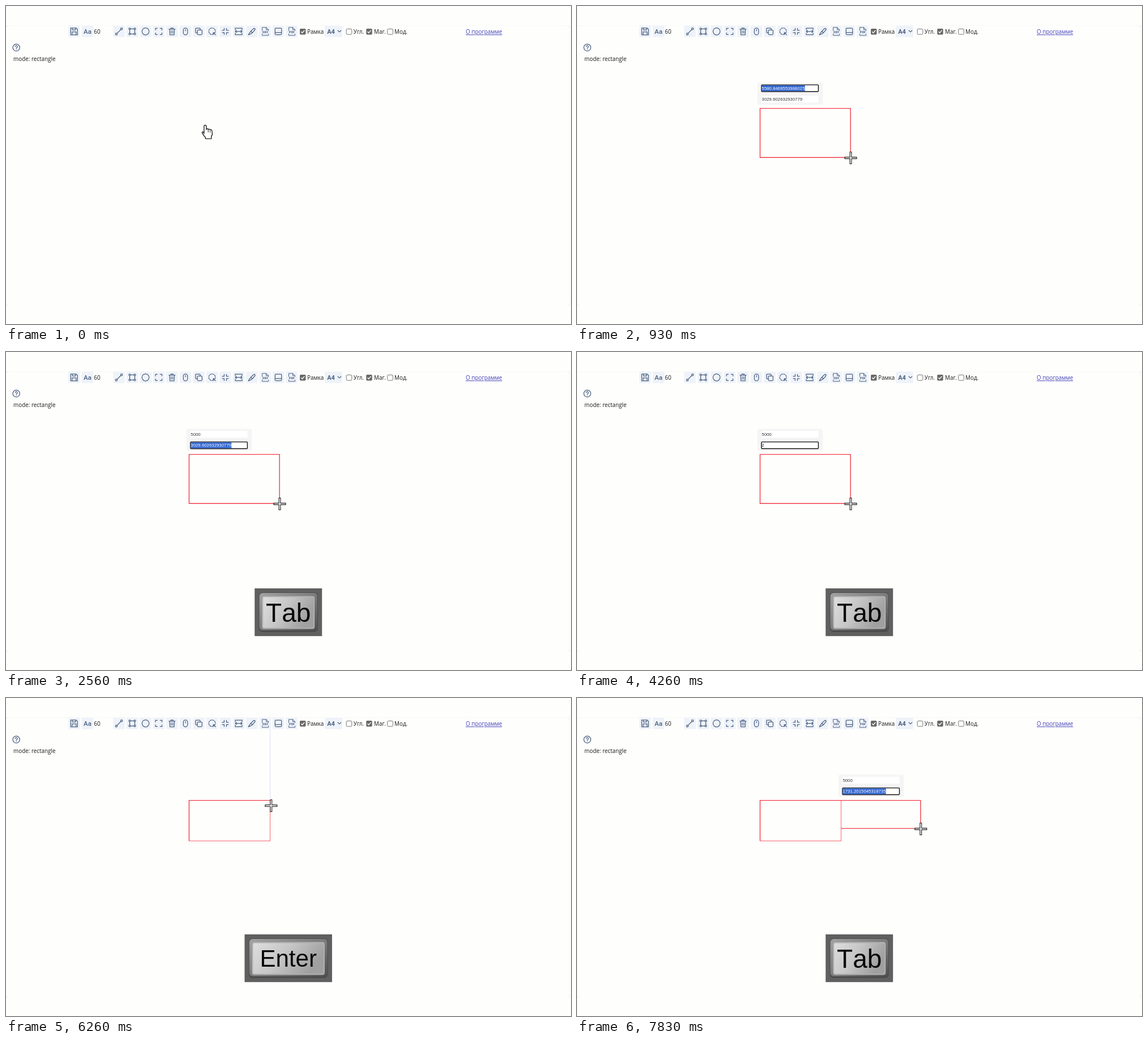
Write an HTML page that moves like this. It is 998 px wide and 561 px high and loops after 8000 ms.

```html
<!DOCTYPE html>
<html lang="ru">
<head>
<meta charset="utf-8">
<title>Rectangle drawing</title>
<style>
  html, body { margin: 0; width: 100%; height: 100%; overflow: hidden; background: #fefefd; }
  svg { display: block; width: 100%; height: 100%; }
  .ui { font: 9.9px "Open Sans", "Noto Sans", sans-serif; fill: #1c1c1c; }
  .field { font: 7.83px "Liberation Sans", Arial, sans-serif; }
  .icon { fill: none; stroke: #4b6080; stroke-width: 1.25; stroke-linecap: round; stroke-linejoin: round; }
  .label { font-family: Roboto, "Noto Sans", sans-serif; font-weight: 700; fill: #4b6080; stroke: none; text-anchor: middle; }
  .key { font-family: "Liberation Sans", Arial, sans-serif; font-kerning: none; text-anchor: middle; fill: #060606; }
  .red { fill: none; stroke: #f23c48; stroke-width: 1.4; }
  .guide { fill: none; stroke: #dcdcf5; stroke-width: 1; }
</style>
</head>
<body>
<svg id="stage" viewBox="0 0 998 561">
  <defs>
    <linearGradient id="face" x1="0" y1="0" x2="1" y2="0.35">
      <stop offset="0" stop-color="#dedede"/><stop offset=".5" stop-color="#c6c6c6"/><stop offset="1" stop-color="#a0a0a0"/>
    </linearGradient>
    <linearGradient id="bevel" x1="0" y1="0" x2="1" y2="1">
      <stop offset="0" stop-color="#a2a2a2"/><stop offset=".5" stop-color="#7c7c7c"/><stop offset="1" stop-color="#505050"/>
    </linearGradient>
  </defs>
  <rect width="998" height="561" fill="#fefefd"/>
  <g fill="none">
    <path d="M4 34.5H992M996 39V524" stroke="#f8f8f8"/>
    <path d="M0 37Q1 34.5 4 34.5M992 34.5Q996 34.5 996 39M996 524Q996 528.5 992 528.5M4 528.5Q1 528.5 0 526" stroke="#ececec"/>
  </g>
  <g id="toolbar"></g>
  <g class="ui">
    <text x="155.3" y="49">60</text>
    <text x="532" y="49.3">Рамка</text>
    <text x="613.8" y="49.3">Угл.</text>
    <text x="650" y="49.3">Маг.</text>
    <text x="686" y="49.3">Мод.</text>
    <text x="812" y="49.3" fill="#4340b8" text-decoration="underline">О программе</text>
    <text x="13" y="97">mode: rectangle</text>
  </g>
  <g class="icon">
    <circle cx="18.2" cy="73.3" r="6.1"/>
    <path d="M16.3 71.8a1.9 1.9 0 1 1 2.9 1.6q-1 .6-1 1.4M18.2 76.6v.1"/>
  </g>
  <g id="scene"></g>
</svg>
<script>
const FRAME = 1000 / 30, LOOP = 8000;
const UNITS = 34.94;                 // drawing units per pixel
const X0 = 323.4, Y0 = 180.6, FULL_W = 5000 / UNITS, FULL_H = 2500 / UNITS;
const X1 = X0 + FULL_W;
const byId = id => document.getElementById(id);

// Toolbar: [centre x, icon drawn around 0,0]
const file = name => `<path d="M-5-1.5V-7H2L6-3V-1.5M2-7V-3H6M-5 4.5V7H6V4.5" stroke-width="1"/>
  <text class="label" x=".5" y="3.2" font-size="5.6">${name}</text>`;
const buttons = [
  [120.3, '<path d="M-6-6H3.5L6-3.5V6H-6ZM-3-6V-2.5H2.5V-6M-3.5 6V.8H3.5V6"/>'],
  [144, '<text class="label" y="4" font-size="11.5" style="font-weight:500">Aa</text>'],
  [199.5, '<path d="M-3.3 3.3L3.3-3.3"/><circle cx="-4.6" cy="4.6" r="1.6"/><circle cx="4.6" cy="-4.6" r="1.6"/>'],
  [223, '<path d="M-2.8-4.5H2.8M-2.8 4.5H2.8M-4.5-2.8V2.8M4.5-2.8V2.8"/>' +
    [[-1, -1], [1, -1], [-1, 1], [1, 1]].map(([x, y]) => `<circle cx="${x * 4.5}" cy="${y * 4.5}" r="1.5"/>`).join('')],
  [246.5, '<circle r="6.2"/>'],
  [269.8, '<path d="M-5.7-2.5V-5.5H-2.5M2.5-5.5H5.7V-2.5M5.7 2.5V5.5H2.5M-2.5 5.5H-5.7V2.5"/>'],
  [293.3, '<path d="M-5.5-4H5.5M-2-4V-6H2V-4M-4.3-4L-3.8 6H3.8L4.3-4M-1.4-1.3V3.3M1.4-1.3V3.3"/>'],
  [317, '<rect x="-3.7" y="-6" width="7.4" height="12" rx="3.5"/><path d="M0-3.4V-1"/>'],
  [340.5, '<rect x="-2.5" y="-2.5" width="8.3" height="8.3" rx="1.5"/><path d="M-2.5 2.5H-4.5Q-5.7 2.5-5.7 1.2V-4.5Q-5.7-5.7-4.5-5.7H1.3Q2.5-5.7 2.5-4.5V-2.5"/>'],
  [364, '<path d="M2.5 5A5.8 5.8 0 1 1 5.7 1" stroke-dasharray="2.6 1.7"/><path d="M2.2 2.2L6 6M2.2 5.5V2.2H5.5"/>'],
  [387.4, '<path d="M-5.5-2H-2V-5.5M2-5.5V-2H5.5M5.5 2H2V5.5M-2 5.5V2H-5.5"/>'],
  [411, '<path d="M-6-3V-5.7H6V-3M-6 3V5.7H6V3M-6 0H6M-4-2L-6 0L-4 2M4-2L6 0L4 2"/>'],
  [434.2, '<path d="M-6 6Q-3 0 4-5.5Q6.5-5.5 5.5-2.8L1 2.5Q-2 5-6 6M-1.7-.5L1 2.5"/>'],
  [457.6, file('DXF')],
  [481, '<rect x="-5.7" y="-5.7" width="11.4" height="11.4" rx="1.5"/><path d="M-5.7 2H5.7"/>'],
  [504.5, file('PDF')]
];

const checkbox = (x, on) => on
  ? `<rect x="${x}" y="40" width="10.4" height="10.4" rx="1.6" fill="#686868"/>
     <path d="M${x + 2.3} 45.3l2.1 2.2 3.8-4.6" fill="none" stroke="#fff" stroke-width="1.4"/>`
  : `<rect x="${x + .5}" y="40.5" width="9.6" height="9.6" rx="1.5" fill="#fff" stroke="#767676"/>`;

byId('toolbar').innerHTML =
  buttons.map(([x, art]) => `<g transform="translate(${x} 44.8)">
    <rect x="-10.3" y="-10.3" width="20.6" height="20.6" rx="2" fill="#eff3f9"/><g class="icon">${art}</g></g>`).join('') +
  '<rect x="563" y="35" width="31" height="20" rx="2" fill="#eff3f9"/>' +
  '<text class="label" x="574" y="49" font-size="11">A4</text>' +
  '<path class="icon" d="M586.3 43.2l2.7 2.7 2.7-2.7"/>' +
  [[519, 1], [600.7, 0], [636.3, 1], [673.3, 0]].map(([x, on]) => checkbox(x, on)).join('');

// Motion: keys are [frame, x, y, easing into this key]
const soft = u => u * u * (3 - 2 * u), speedUp = u => u * u, slowDown = u => u * (2 - u);
const pointer = [
  [0, 351.5, 210], [8, X0, 181, soft], [12, X0, 181],
  [18, 368, 205, speedUp], [28, 483.5, 268, slowDown], [180, 483.5, 268],
  [190, X1, 181, soft], [194, X1, 181],
  [203, 574, 222.7, speedUp], [206, 607.3, 231, slowDown]
];
const firstSize = [[12, 0, 0],
  [18, 1457.8538985531566, 774.4848836063644, speedUp],
  [28, 5580.8469553988025, 3029.602632930779, slowDown]];
const secondSize = [[194, 0, 0],
  [203, 3405.4388838455448, 1343.9590627286912, speedUp],
  [206, 4905.7316482093725, 1731.2015045318735, slowDown]];

function at(keys, k) {
  const i = keys.findIndex(key => key[0] >= k);
  if (i < 0) return keys[keys.length - 1].slice(1, 3);
  if (i === 0) return keys[0].slice(1, 3);
  const a = keys[i - 1], b = keys[i];
  const u = (b[3] || soft)((k - a[0]) / (b[0] - a[0]));
  return [1, 2].map(n => a[n] * (1 - u) + b[n] * u);
}

// Typing: text grows by one character at each listed frame
const typed = (text, frames, k) => text.slice(0, frames.filter(f => f <= k).length);

function field(x, y, value, entry, focused) {
  const text = entry || String(value), chosen = focused && !entry;
  const width = [...text].reduce((w, c) => w + (c === '.' ? .278 : .556), 0) * 7.83;
  return `<rect x="${x + 2.4}" y="${y}" width="100.6" height="11.9" rx="1.3" fill="#fff"
      ${focused ? 'stroke="#101010" stroke-width="1.4"' : ''}/>` +
    (chosen ? `<rect x="${x + 3}" y="${y + .8}" width="${width}" height="10.3" fill="#3266d0"/>` : '') +
    `<text class="field" x="${x + 2.9}" y="${y + 8.6}" fill="${chosen ? '#fff' : '#333'}">${text}</text>`;
}

function panel(x, size, entries, onSecond) {
  return `<rect x="${x - 4.6}" y="135.5" width="115.4" height="38.7" rx="3" fill="#f5f5f6"/>` +
    field(x, 139.1, size[0], entries[0], !onSecond) +
    field(x, 158.6, size[1], entries[1], onSecond);
}

function keycap(label, width, size, y) {
  const box = (inset, top, height, fill, rx) =>
    `<rect x="${498.7 - width / 2 + inset}" y="${top}" width="${width - 2 * inset}" height="${height}" rx="${rx}" fill="${fill}"/>`;
  return box(0, 417, 84.2, '#606060', 0) + box(7.3, 424, 70, '#4c4c4c', 7) +
    box(8.3, 425, 66, 'url(#bevel)', 6) + box(13, 430.5, 58, '#b2b2b2', 4) +
    box(15, 432.5, 54, 'url(#face)', 2) +
    `<text class="key" x="498.7" y="${y}" font-size="${size}">${label}</text>`;
}

const edges = (x, size, end) =>
  `<path class="red" d="M${x} ${Y0}H${x + size[0] / UNITS}V${Y0 + size[1] / UNITS}H${x}${end}"/>`;

const finished = `<path class="red" style="stroke:#f97c84;stroke-width:1.2" d="M${X1} ${Y0}v${FULL_H}H${X0}"/>
  <path class="red" d="M${X0} ${Y0 + FULL_H}V${Y0}H${X1}"/>`;

function guides(k, [x, y]) {
  if (k <= 180) return '';
  const mid = Y0 + FULL_H / 2;
  let d = '';
  if (Math.abs(y - Y0) < 8) d += `M${X0 + FULL_W / 2} ${Y0}H990`;
  if (Math.abs(y - mid) < 8) d += `M${X1} ${mid}H990`;
  if (Math.abs(x - X1) < 8 && k < 189) d += `M${X1} ${Y0}V55`;
  return d && `<path class="guide" d="${d}"/>`;
}

const hand = `<path d="M4 15.5V2.7a2 2 0 0 1 4 0V8.5q0-1.5 1.6-1.5T11.4 8.7q.2-1.2 1.7-1 1.5.2 1.6 1.7.3-.9 1.7-.6 1.5.4 1.5 2.2L18.6 15q.2 3-1.7 5.7V24.6H6.4V22Q3 19 .8 14.6q-.6-1.7.8-2.1 1.3-.2 2.4 3Z"
  transform="translate(-5.7 -.5)" fill="#fff" stroke="#222" stroke-width="1.4" stroke-linejoin="round"/>
  <path d="M5.7 9v4M9 10v3" stroke="#222"/>`;
const cross = `<path d="M-1.4-10.5H1.4V-1.4H10.5V1.4H1.4V10.5H-1.4V1.4H-10.5V-1.4H-1.4Z" fill="#fff" stroke="#1a1a1a" stroke-width="1.1"/>`;

function draw(ms) {
  const k = Math.floor((ms + 6.7) / FRAME);
  const pos = at(pointer, k);
  let out = guides(k, pos);

  if (k >= 13 && k < 162) {
    const size = at(firstSize, k);
    const entries = [typed('5000', [64, 70, 72, 74], k), typed('2500', [128, 130, 150, 151], k)];
    out += panel(X0, size, entries, k >= 77) + edges(X0, size, 'Z');
  }
  if (k >= 162) out += finished;
  if (k >= 195) {
    const size = at(secondSize, k);
    out += panel(X1, size, [typed('5000', [223, 228, 230, 232], k), ''], k >= 235) + edges(X1, size, '');
  }
  if (k >= 159 && k < 235) out += keycap('Enter', 154.5, 42, 474);
  else if (k >= 77) out += keycap('Tab', 119, 46, 476);

  out += `<g transform="translate(${pos})">${k < 1 ? hand : cross}</g>`;
  byId('scene').innerHTML = out;
}

const start = performance.now();
function tick() {
  draw((performance.now() - start) % LOOP);
  requestAnimationFrame(tick);
}
tick();
</script>
</body>
</html>
```
